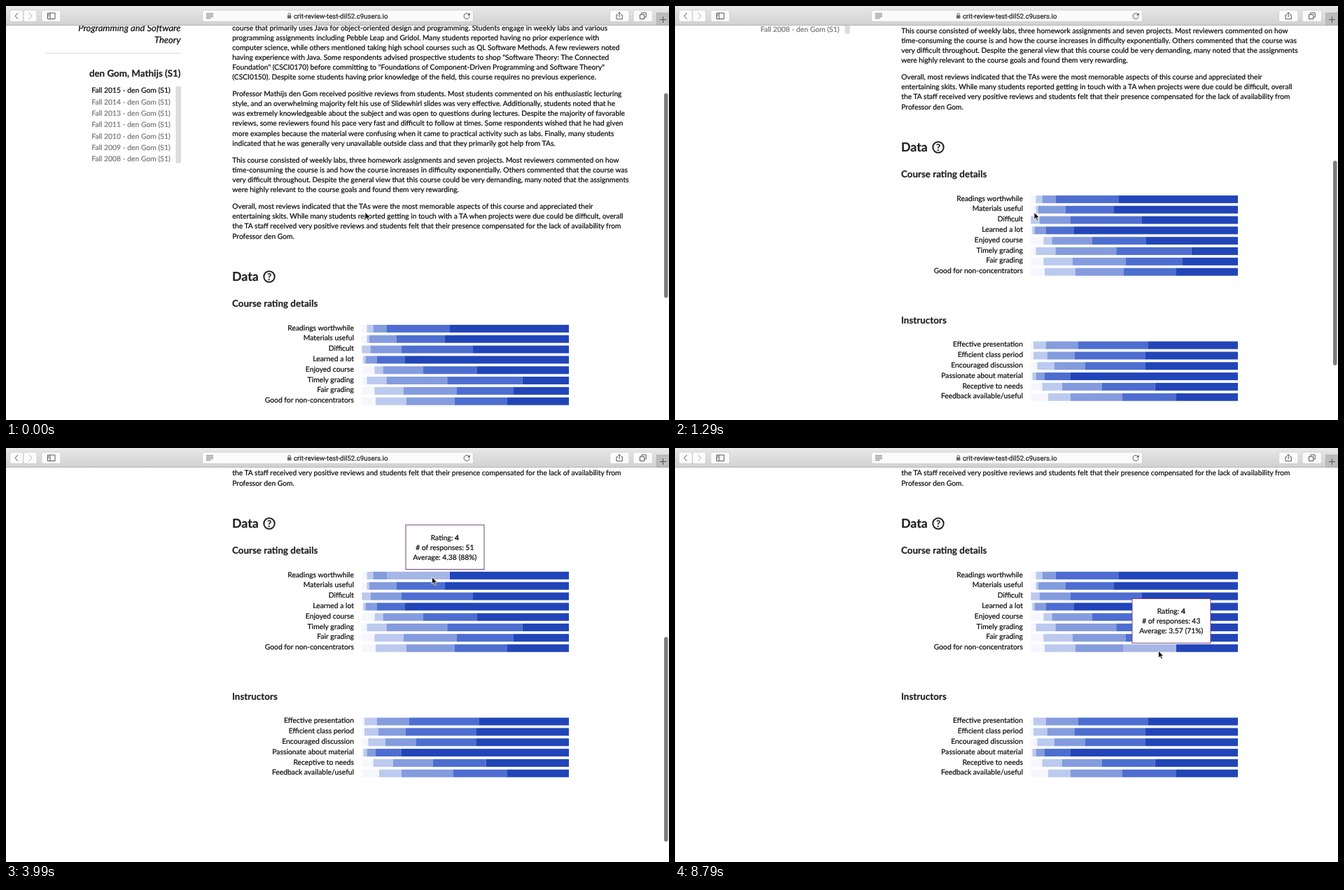
An HTML page for the animation above (8.85 s loop, 947 by 592 pixels).

```html
<!DOCTYPE html>
<html lang="en">
<head>
<meta charset="utf-8">
<title>Course review</title>
<style>
  html, body { margin: 0; width: 100%; height: 100%; overflow: hidden; background: #fff; }
  svg { display: block; width: 947px; height: 592px; }
  text {
    font: 10.36px Lato, sans-serif; white-space: pre; text-rendering: geometricPrecision;
    color: #0c0c0c; fill: currentColor; stroke: currentColor; stroke-width: .22px;
  }
  .b { font-weight: 700; }
  .para { font-size: 10.26px; }
  .h2 { font-size: 17.8px; font-weight: 700; color: #222; }
  .h3 { font-size: 13.4px; font-weight: 700; color: #222; }
  .title { font-size: 13px; font-style: italic; }
  .old { color: #777; }
  .end { text-anchor: end; }
  .mid { text-anchor: middle; }
  .url { font: 9.7px Roboto, sans-serif; color: #222; }
  .icon { fill: none; stroke: #555; stroke-width: 1; }
  .btn { fill: #fbfbfb; stroke: #c9c8c9; stroke-width: .7; }
</style>
</head>
<body>
<svg id="stage" viewBox="0 0 947 592">
  <defs>
    <linearGradient id="chrome" x2="0" y2="1">
      <stop offset="0" stop-color="#e9e8e9"/><stop offset="1" stop-color="#d2d1d2"/>
    </linearGradient>
  </defs>
  <g id="page"></g>
  <rect id="thumb" x="940" width="5.6" height="292.5" rx="2.8" fill="#7d7d7d"/>
  <g id="toolbar">
    <rect width="947" height="27.5" fill="url(#chrome)"/>
    <rect y="27" width="947" height="1" fill="#b4b3b4"/>
    <rect x="929.5" y="10" width="18" height="17.5" fill="#bdbcbd" stroke="#a8a7a8" stroke-width=".7"/>
    <path class="icon" d="M934 19.5h9M938.5 15v9"/>
    <g id="buttons"></g>
    <path class="icon" d="M17 10l-4 4.3 4 4.3"/>
    <path class="icon" d="M33 10l4 4.3-4 4.3" style="stroke:#aaa"/>
    <path class="icon" d="M59.5 10h10.5v8.5h-10.5zM63 10v8.5M60.5 12h1.5M60.5 14h1.5"/>
    <path class="icon" d="M286 10.8h10M286 13h10M286 15.2h10M286 17.4h6.5" style="stroke-width:.9;stroke:#666"/>
    <rect x="402" y="13.2" width="5.4" height="4.6" rx=".6" fill="#666"/>
    <path class="icon" d="M403.1 13.4v-1.5a1.6 1.6 0 0 1 3.2 0v1.5" style="stroke:#666"/>
    <text class="url" x="411" y="17.7">crit-review-test-dil52.c9users.io</text>
    <path class="icon" d="M661.4 12.2a4 4 0 1 0 .7 2.6"/>
    <path d="M662.7 9.8v3.6h-3.6z" fill="#555"/>
    <path class="icon" d="M874 12.7h-2v6h8.3v-6h-2M876.1 16v-6.6M874 11.2l2.1-2.1 2.1 2.1"/>
    <path class="icon" d="M905.5 12.3h6.2v6.2h-6.2zM907.8 12v-2.2h6.4v6.2h-2.2"/>
  </g>
  <g id="tip">
    <rect x=".5" y=".5" width="112" height="63.5" fill="#fff" stroke="#74417f"/>
    <text class="mid" x="56.3" y="22.3">Rating: <tspan class="b" id="rating"></tspan></text>
    <text class="mid" x="56.3" y="36.4" id="count"></text>
    <text class="mid" x="56.3" y="50.4" id="average"></text>
  </g>
  <path id="cursor" d="M0 0v10.2l2.4-2.2 1.7 4 1.8-.8-1.7-3.8h3.2z" fill="#111" stroke="#fff" stroke-width=".8"/>
</svg>
<script>
const $ = id => document.getElementById(id);
const LOOP = 8850, STEP = 30, LAG = 60;
const page = $('page');

function add(parent, tag, attrs, content) {
  const el = document.createElementNS('http://www.w3.org/2000/svg', tag);
  for (const k in attrs) el.setAttribute(k, attrs[k]);
  if (content) el.textContent = content;
  return parent.appendChild(el);
}
const text = (x, y, s, cls = '') => add(page, 'text', { x, y, class: cls }, s);

// Toolbar buttons: left edge and width
for (const [x, width] of [[5.5, 19], [25, 19], [51, 27], [280.5, 387], [862.5, 27.5], [896, 27.5]])
  add($('buttons'), 'rect', { class: 'btn', x, y: 6, width, height: 16.3, rx: 2.5 });

// Sidebar
text(249.5, 36, 'Programming and Software', 'title end');
text(249.5, 52.5, 'Theory', 'title end');
add(page, 'rect', { x: 56, y: 67, width: 194, height: 1, fill: '#dcdcdc' });
text(249.5, 100.5, 'den Gom, Mathijs (S1)', 'h3 end');
[2015, 2014, 2013, 2011, 2010, 2009, 2008].forEach((year, i) =>
  text(234.7, 124.2 + i * 16.33, `Fall ${year} - den Gom (S1)`, i ? 'end old' : 'end'));
add(page, 'rect', { x: 242.5, y: 115, width: 7.5, height: 109.5, fill: '#dcdcdc' });

// Review
const review = `course that primarily uses Java for object-oriented design and programming. Students engage in weekly labs and various
programming assignments including Pebble Leap and Gridol. Many students reported having no prior experience with
computer science, while others mentioned taking high school courses such as QL Software Methods. A few reviewers noted
having experience with Java. Some respondents advised prospective students to shop "Software Theory: The Connected
Foundation" (CSCI0170) before committing to "Foundations of Component-Driven Programming and Software Theory"
(CSCI0150). Despite some students having prior knowledge of the field, this course requires no previous experience.

Professor Mathijs den Gom received positive reviews from students. Most students commented on his enthusiastic lecturing
style, and an overwhelming majority felt his use of Slidewhirl slides was very effective. Additionally, students noted that he
was extremely knowledgeable about the subject and was open to questions during lectures. Despite the majority of favorable
reviews, some reviewers found his pace very fast and difficult to follow at times. Some respondents wished that he had given
more examples because the material were confusing when it came to practical activity such as labs. Finally, many students
indicated that he was generally very unavailable outside class and that they primarily got help from TAs.

This course consisted of weekly labs, three homework assignments and seven projects. Most reviewers commented on how
time-consuming the course is and how the course increases in difficulty exponentially. Others commented that the course was
very difficult throughout. Despite the general view that this course could be very demanding, many noted that the assignments
were highly relevant to the course goals and found them very rewarding.

Overall, most reviews indicated that the TAs were the most memorable aspects of this course and appreciated their
entertaining skits. While many students reported getting in touch with a TA when projects were due could be difficult, overall
the TA staff received very positive reviews and students felt that their presence compensated for the lack of availability from
Professor den Gom.`;
let lineY = 34.6;
for (const line of review.split('\n')) {
  if (line) text(323.3, lineY, line, 'para');
  lineY += line ? 14.07 : 10.2;
}

// Charts
text(323, 393, 'Data', 'h2');
add(page, 'circle', { cx: 376, cy: 387, r: 7.7, fill: 'none', stroke: '#222', 'stroke-width': 2 });
text(376, 391.8, '?', 'h3 mid');
text(323, 430, 'Course rating details', 'h3');
text(323, 639, 'Instructors', 'h3');

const LEFT = 508.3, RIGHT = 804, BAR = 11, PITCH = 14.83, PER_PX = .567;
const COLORS = ['#f6f7fe', '#bccaf0', '#849cde', '#4d6ed0', '#2145b8'];
const rows = [];

function chart(top, data) {
  data.forEach(([label, ...cuts], i) => {
    const y = top + i * PITCH;
    const edges = [LEFT, ...cuts, RIGHT];
    text(497, y + 7.6, label, 'end');
    const bars = COLORS.map((fill, k) => add(page, 'rect',
      { x: edges[k], y, width: Math.max(0, edges[k + 1] - edges[k]), height: BAR, fill }));
    const counts = COLORS.map((_, k) => Math.round((edges[k + 1] - edges[k]) * PER_PX));
    const total = counts.reduce((a, n) => a + n);
    const mean = counts.reduce((a, n, k) => a + n * (k + 1), 0) / total;
    rows.push({ y, edges, bars, counts, mean });
  });
}
chart(455.9, [
  ['Readings worthwhile', 515.5, 524.5, 544, 634],
  ['Materials useful', 515.5, 519, 558, 626.3],
  ['Difficult', 508.3, 520.7, 565, 667],
  ['Learned a lot', 510.3, 513.7, 529.5, 570],
  ['Enjoyed course', 526.5, 538.5, 595.5, 673],
  ['Timely grading', 515.5, 543.5, 630.3, 737.5],
  ['Fair grading', 526.3, 568, 644, 725],
  ['Good for non-concentrators', 528, 572, 640.5, 716],
]);
chart(664.6, [
  ['Effective presentation', 512, 530, 575.5, 676],
  ['Efficient class period', 512, 531.7, 571, 671.3],
  ['Encouraged discussion', 517.3, 542, 586, 672],
  ['Passionate about material', 510.5, 515.5, 528, 565],
  ['Receptive to needs', 524.5, 553, 609.5, 685.5],
  ['Feedback available/useful', 533, 565, 639, 716],
]);

// Motion: time followed by values
const SCROLL = [[0, 0], [60, 20], [200, 85], [450, 165], [700, 183], [900, 185],
  [1300, 185], [1420, 225], [1560, 268], [1740, 279]];
const THUMB_FADE = [[4800, 1], [5050, 0]];
const POINTER = [[1770, 513, 295], [1860, 521, 293], [1950, 532, 288], [2150, 556, 288],
  [2500, 606, 287], [2900, 680, 287], [3200, 750, 287], [3500, 740, 186], [3800, 640, 185],
  [3930, 608.5, 184.5], [4300, 608, 184.5], [4900, 580, 184], [5500, 539, 183], [5800, 539, 183],
  [6300, 530, 184], [6700, 519, 184], [7200, 530, 240], [7600, 600, 288], [8200, 670, 289],
  [8700, 690.5, 290]];

function at(track, t) {
  const i = track.findIndex(p => p[0] > t);
  if (i === 0) return track[0].slice(1);
  if (i < 0) return track[track.length - 1].slice(1);
  const a = track[i - 1], b = track[i], u = (t - a[0]) / (b[0] - a[0]);
  return a.slice(1).map((v, k) => v + (b[k + 1] - v) * u);
}
const move = (el, x, y) => el.setAttribute('transform', `translate(${x} ${y})`);

let lit = null;
function hover(t, scroll) {
  if (lit) lit.removeAttribute('opacity');
  lit = null;
  // The tooltip trails the pointer slightly
  const [x, y] = at(POINTER, t - LAG);
  const docY = y + scroll;
  const row = t >= 1800 && x >= LEFT && x < RIGHT &&
    rows.find(r => docY >= r.y && docY <= r.y + BAR + .3);
  $('tip').style.display = row ? '' : 'none';
  if (!row) return;
  const k = row.edges.findIndex(e => e > x) - 1;
  lit = row.bars[k];
  lit.setAttribute('opacity', .5);
  $('rating').textContent = k + 1;
  $('count').textContent = `# of responses: ${row.counts[k]}`;
  $('average').textContent = `Average: ${row.mean.toFixed(2)} (${Math.round(row.mean * 20)}%)`;
  move($('tip'), x - 38, y - 75);
}

function draw(t) {
  const [scroll] = at(SCROLL, t);
  move(page, 0, -scroll);
  $('thumb').setAttribute('y', 124.7 + scroll * .522);
  $('thumb').setAttribute('opacity', at(THUMB_FADE, t)[0]);
  move($('cursor'), ...at(POINTER, t));
  hover(t, scroll);
}

const start = performance.now();
function tick() {
  const t = (performance.now() - start) % LOOP;
  draw(Math.min(Math.floor(t / STEP) * STEP, LOOP - 2 * STEP));
  requestAnimationFrame(tick);
}
tick();
</script>
</body>
</html>
```
